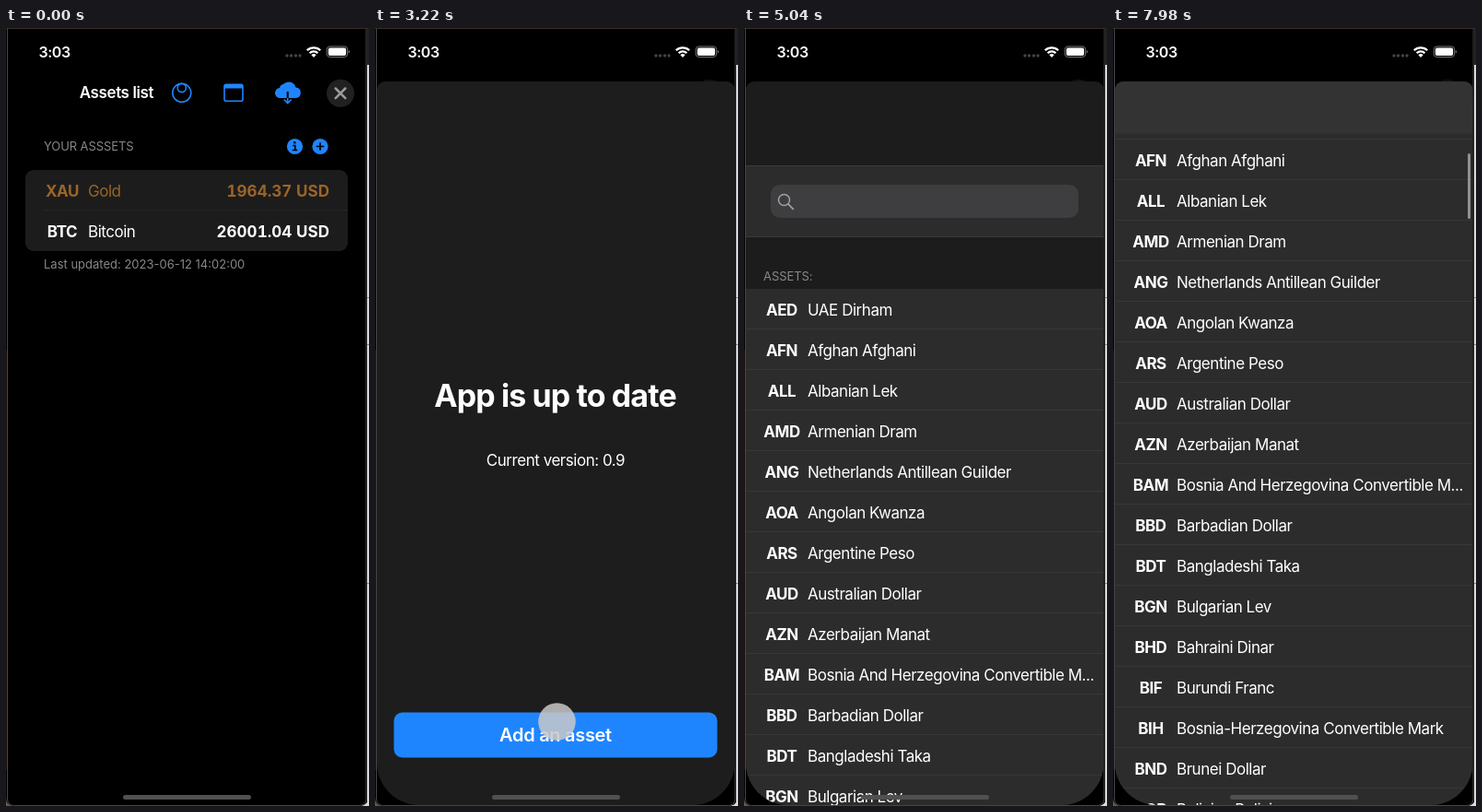
An HTML page for the animation above (8000 ms loop, 394 by 844 pixels).

```html
<!DOCTYPE html>
<html lang="en">
<head>
<meta charset="utf-8">
<title>Assets list</title>
<style>
  html, body { margin: 0; width: 100%; height: 100%; overflow: hidden; background: #000; }
  svg { display: block; width: 394px; height: 844px; }
  text { font: 400 17px Inter, "Liberation Sans", sans-serif; letter-spacing: -.47px; fill: #fff; }
  .semi { font-weight: 600; letter-spacing: -.38px; }
  .bold { font-weight: 700; }
  .time { font-size: 16px; font-weight: 600; letter-spacing: -.4px; }
  .small { font-size: 13px; letter-spacing: -.08px; fill: #87878b; }
  .stamp { letter-spacing: 0; }
  .price { font-weight: 700; font-variant-numeric: tabular-nums; letter-spacing: .05px; }
  .gold { fill: #9c6527; }
  .title { font-size: 34px; font-weight: 700; letter-spacing: -.9px; }
  .button { font-size: 20px; font-weight: 600; letter-spacing: -.3px; }
  .mid { text-anchor: middle; }
  .end { text-anchor: end; }
  .blue { fill: #1f85ff; }
  .line { fill: none; stroke: #1f85ff; stroke-width: 1.6; }
</style>
</head>
<body>
<svg viewBox="0 0 394 844">
  <defs>
    <clipPath id="screen"><path d="M2 1H390.500V797a46 46 0 0 1-46 46H48a46 46 0 0 1-46-46Z"/></clipPath>
    <clipPath id="panel"><path d="M2 67a9 9 0 0 1 9-9H381.500a9 9 0 0 1 9 9V844H2Z"/></clipPath>
  </defs>

  <!-- window edges -->
  <rect width="394" height="844"/>
  <path d="M0 350h1v455h-1Z" fill="#1a100c"/>
  <path d="M392 0h2v40h-2Z" fill="#222"/>
  <path d="M392 40h2v804h-2Z" fill="#dcdcdc"/>
  <path d="M392 292.500h2m-2 51h2m-2 259h2" stroke="#888"/>
  <path d="M0 835q0 8 8 9H0Z" fill="#6b5750"/>
  <path d="M393 835q0 8-8 9h9v-9Z" fill="#dcdcdc"/>
  <path d="M0 .5H392" stroke="#3a2d29"/>
  <path d="M1.500 1V836q0 7 7 7.500H384q7-.5 7-7.500V1" fill="none" stroke="#484644"/>

  <g clip-path="url(#screen)">
    <!-- main screen -->
    <text class="semi" x="79.700" y="76">Assets list</text>
    <g class="line">
      <circle cx="190.800" cy="70.300" r="10"/>
      <circle cx="190.800" cy="65" r="4.600"/>
      <rect x="237" y="61.300" width="20" height="18" rx="2"/>
    </g>
    <path class="blue" d="M237 61h20v4.500h-20Z"/>
    <path class="blue" d="M298 76a5.500 5.500 0 0 1-1-11 5 5 0 0 1 4-4 8 8 0 0 1 13.500 3.500 5.800 5.800 0 0 1 .5 11.500Z"/>
    <path d="M305.700 69v7.500" stroke="#000" stroke-width="2"/>
    <path class="line" d="M305.700 76V81.500m-4-4 4 4 4-4"/>
    <circle cx="363" cy="70.800" r="15" fill="#212122"/>
    <path d="m357.700 65.500 10.600 10.600m0-10.600-10.600 10.600" stroke="#9b9b9f" stroke-width="2.500" stroke-linecap="round"/>
    <text class="small" x="41" y="133">YOUR ASSSETS</text>
    <circle class="blue" cx="313.500" cy="128.500" r="8.600"/>
    <circle class="blue" cx="341" cy="128.500" r="8.600"/>
    <circle cx="313.300" cy="124.300" r="1.300"/>
    <path d="M311.300 127.500h2.500v5m-3 0h5.500M336.700 128.500h8.600m-4.300-4.300v8.600" fill="none" stroke="#000" stroke-width="1.700"/>
    <rect x="21" y="154" width="350" height="88" rx="9" fill="#1c1c1d"/>
    <path d="M41 197.500H371" stroke="#252526"/>
    <text class="bold gold mid" x="61" y="182.500">XAU</text>
    <text class="gold" x="89" y="182.500">Gold</text>
    <text class="price gold end" x="351" y="182.500">1964.37 USD</text>
    <text class="bold mid" x="61" y="226.500">BTC</text>
    <text x="89" y="226.500">Bitcoin</text>
    <text class="price end" x="351" y="226.500">26001.04 USD</text>
    <text class="small stamp" x="41" y="260.500">Last updated: 2023-06-12 14:02:00</text>

    <rect id="dim" width="394" height="844"/>

    <!-- version sheet -->
    <g id="info">
      <g clip-path="url(#panel)">
        <rect y="58" width="394" height="786" fill="#1d1d1d"/>
        <text class="title mid" x="195.500" y="410.500">App is up to date</text>
        <text class="mid" x="196" y="475">Current version: 0.9</text>
        <rect class="blue" x="20.500" y="742.500" width="351" height="49" rx="9"/>
        <text class="button mid" x="196" y="774">Add an asset</text>
      </g>
    </g>

    <!-- currency sheet -->
    <g id="picker">
      <g clip-path="url(#panel)">
        <rect y="58" width="394" height="786" fill="#1c1c1c"/>
        <g id="list">
          <path d="M0 149H394V227H0Z" fill="#2c2c2c"/>
          <path d="M0 149.500H394M0 226.500H394" stroke="#3b3b3b"/>
          <rect x="29" y="170" width="334" height="36" rx="10" fill="#3e3e41"/>
          <circle cx="43.500" cy="186.500" r="6" fill="none" stroke="#a0a0a5" stroke-width="1.500"/>
          <path d="m48 191 5.300 5.300" stroke="#a0a0a5" stroke-width="1.700" stroke-linecap="round"/>
          <text class="small" x="21" y="274">ASSETS:</text>
          <g id="rows"></g>
        </g>
        <path id="bar" d="M0 58H394V114.500H0Z" fill="#333334"/>
        <rect id="thumb" x="385" width="3" height="71" rx="1.500" fill="#909090"/>
      </g>
    </g>
  </g>

  <!-- status bar and home indicator -->
  <text class="time" x="35.400" y="31.500">3:03</text>
  <g fill="#444">
    <circle cx="305" cy="30" r="1.700"/><circle cx="309.500" cy="30" r="1.700"/>
    <circle cx="314.500" cy="30" r="1.700"/><circle cx="319" cy="30" r="1.700"/>
  </g>
  <g fill="none" stroke="#fff" stroke-width="2.200">
    <path d="M326.800 24.300a10.200 10.200 0 0 1 14.400 0M329.600 27.200a6.200 6.200 0 0 1 8.800 0"/>
  </g>
  <path d="m334 32-2.600-2.800a3.700 3.700 0 0 1 5.200 0Z" fill="#fff"/>
  <rect x="348.200" y="20" width="22.500" height="11.500" rx="3.500" fill="none" stroke="#777"/>
  <rect x="349.800" y="21.600" width="19.300" height="8.300" rx="2" fill="#fff"/>
  <path d="M371.800 24v3.600q1.300-.6 1.300-1.800t-1.300-1.800" fill="#777"/>
  <rect x="127" y="832" width="139" height="5" rx="2.500" fill="#505050"/>

  <circle id="touch" r="20.300" fill="#c8c8c8" fill-opacity=".85"/>
</svg>
<script>
  const LOOP = 8000, TICK = 70, ROW = 44, TOP = 283, HEIGHT = 786;
  const CURRENCIES = `AED UAE Dirham|AFN Afghan Afghani|ALL Albanian Lek|AMD Armenian Dram
    |ANG Netherlands Antillean Guilder|AOA Angolan Kwanza|ARS Argentine Peso|AUD Australian Dollar
    |AZN Azerbaijan Manat|BAM Bosnia And Herzegovina Convertible M...|BBD Barbadian Dollar
    |BDT Bangladeshi Taka|BGN Bulgarian Lev|BHD Bahraini Dinar|BIF Burundi Franc
    |BIH Bosnia-Herzegovina Convertible Mark|BND Brunei Dollar|BOB Bolivian Boliviano
    |BRL Brazilian Real|BSD Bahamian Dollar|BTC Bitcoin|BTN Bhutanese Ngultrum
    |BYN Belarusian Ruble|BZD Belize Dollar|CAD Canadian Dollar|CDF Congolese Franc
    |CHF Swiss Franc|CLF Chilean Unit Of Account`.split('|').map(s => s.trim());

  const el = id => document.getElementById(id);
  const [dim, info, picker, list, rows, bar, thumb, touch] =
    ['dim', 'info', 'picker', 'list', 'rows', 'bar', 'thumb', 'touch'].map(el);

  rows.innerHTML = CURRENCIES.map((item, i) => {
    const code = item.slice(0, 3), y = TOP + i * ROW;
    return `<rect id="${code}" y="${y}" width="394" height="${ROW}" fill="#2c2c2c"/>
      <path d="M0 ${y + ROW - .5}H394" stroke="#373737"/>
      <text class="bold mid" x="41" y="${y + 29}">${code}</text>
      <text x="69" y="${y + 29}">${item.slice(4)}</text>`;
  }).join('');
  const bitcoin = el('BTC');

  const clamp = v => Math.min(1, Math.max(0, v));
  const easeOut = p => 1 - (1 - clamp(p)) ** 2;

  // Critically damped spring, 0 to 1
  const spring = ms => {
    const x = Math.max(0, ms) * .016;
    return 1 - (1 + x) * Math.exp(-x);
  };

  const scrollAt = t => 683 * easeOut((t - 6720) / 560) - 477 * easeOut((t - 7280) / 700);

  // from, to, x, y
  const TOUCHES = [
    [1820, 1960, 314, 138],
    [3220, 3290, 197.5, 752.5],
    [6650, 6860, 266.5, 421.5]
  ];

  function show(node, on) { node.setAttribute('visibility', on ? 'visible' : 'hidden'); }
  function shift(node, y) { node.setAttribute('transform', `translate(0 ${y.toFixed(2)})`); }

  function place(sheet, open) {
    show(sheet, open > 0);
    shift(sheet, (1 - open) * HEIGHT);
  }

  function draw(time) {
    const t = Math.floor(time % LOOP / TICK) * TICK;
    const infoOpen = t < 3850 ? spring(t - 1940) - spring(t - 3270) : 0;
    const pickerOpen = spring(t - 3970);
    place(info, infoOpen);
    place(picker, pickerOpen);
    dim.setAttribute('opacity', .5 * Math.max(infoOpen, pickerOpen));

    const scroll = scrollAt(t);
    shift(list, -scroll);
    bar.setAttribute('opacity', clamp(scroll / 35));
    thumb.setAttribute('y', 117 + scroll * .0923);
    thumb.setAttribute('opacity', scroll > 0 ? 1 : 0);
    bitcoin.setAttribute('fill', t === 7280 ? '#a9a9a9' : '#2c2c2c');

    const tap = TOUCHES.find(([from, to]) => t >= from && t < to);
    show(touch, tap);
    if (tap) {
      touch.setAttribute('cx', tap[2]);
      touch.setAttribute('cy', tap[3] - scroll);
    }
  }

  const start = performance.now();
  function loop() {
    draw(performance.now() - start);
    requestAnimationFrame(loop);
  }
  loop();
</script>
</body>
</html>
```
